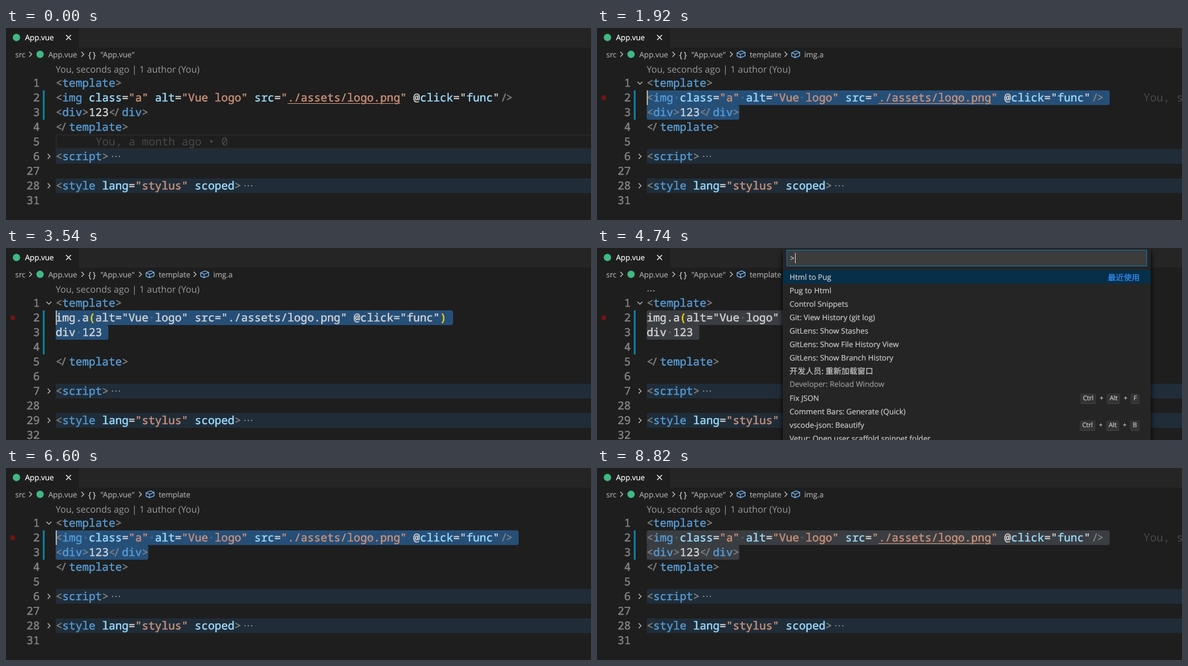
Animation of 954 by 314 pixels, one loop 9 s. Source, as an HTML page:

```html
<!DOCTYPE html>
<html lang="en">
<head>
<meta charset="utf-8">
<title>Html to Pug and back</title>
<style>
html, body { margin: 0; width: 100%; height: 100%; overflow: hidden; background: #1e1e1e; }
body { position: relative; text-rendering: geometricPrecision; -webkit-text-stroke: .2px;
  font: 12.35px/22px "Open Sans", "Noto Sans", "Noto Sans CJK SC", sans-serif; color: #ccc; }
div, pre, svg { position: absolute; margin: 0; white-space: pre; }
pre { left: 81px; top: 102px; color: #d4d4d4; -webkit-text-stroke: .45px;
  font: 500 18px/24px "Noto Sans Mono", "DejaVu Sans Mono", monospace; }

/* syntax colours */
.p { color: #808080; }
.t { color: #569cd6; }
.a { color: #9cdcfe; }
.s { color: #ce9178; }
.g { color: #ffd700; }
.open, .shut { color: #808080; position: relative; left: -3px; }
.shut { left: 2px; }
.dots { color: rgba(227, 228, 226, .2); }
.blame { color: #494949; -webkit-text-stroke: 0; }

/* editor chrome */
.tabs { left: 119px; top: 0; right: 0; height: 32px; background: #252526; }
.name { left: 31px; top: 5px; color: #fff; }
.crumbs { left: 0; top: 33px; color: #a9a9a9; }
.crumbs span { position: absolute; top: 0; }
.crumbs .brace { font-size: 13.5px; letter-spacing: 2.5px; color: #ccc; }
.lens { left: 81px; top: 56px; font-size: 15px; line-height: 24px; color: #999; -webkit-text-stroke: 0; }
.lens.short { top: 53px; font-size: 18px; }
.layer { left: 0; top: 0; width: 954px; height: 314px; }
.nums { left: 0; top: 78px; width: 55px; text-align: right; color: #858585; }
.bar { left: 60px; top: 102px; width: 3px; height: 48px; background: #0c7d9d; }
.current { left: 81px; top: 174px; width: 873px; height: 24px; box-sizing: border-box; border: 2px solid #282828; border-right: 0; }
.tail { left: 0; top: 150px; width: 954px; }
.tail pre { top: 0; }
.fold { left: 81px; right: 0; height: 24px; background: #202d39; }
.more { display: inline-block; width: 16.5px; height: 24px; margin-left: 4px; vertical-align: top;
  background: radial-gradient(circle, #8a8a8a .8px, transparent 1.4px) 0 0 / 5.5px 24px; }
.sel { height: 24px; background: #264f78; border-radius: 3px; }
.one { left: 81px; top: 102px; }
.two { left: 81px; top: 126px; }
.caret { left: 81px; top: 102px; width: 2px; height: 24px; background: #aeafad; }
.icons { left: 0; top: 0; fill: none; stroke: #c5c5c5; stroke-width: 1.2; }

/* command palette */
.palette { left: 303px; top: 0; width: 600px; height: 330px; background: #252526; box-shadow: 0 5px 8px #000; }
.input { left: 6px; top: 3px; width: 581px; height: 25px; padding-left: 5px; line-height: 26px;
  background: #3c3c3c; border: 1px solid #0a78bf; }
.beam { left: 20px; top: 8px; width: 1px; height: 17px; background: #d4d4d4; }
.pick { left: 0; top: 36px; width: 600px; height: 22px; background: #062f4a; }
.list { left: 11px; top: 37px; width: 571px; }
.slider { right: 0; top: 36px; width: 10px; height: 20px; background: rgba(121, 121, 121, .4); }
.zh { font: 13px/22px "Noto Sans CJK SC", "Noto Sans CJK", sans-serif; }
.dim { opacity: .7; line-height: 20px; }
.recent { right: 0; top: 0; color: #3794ff; }
.keys { right: 0; font-size: 10.45px; }
kbd { display: inline-block; font: inherit; line-height: 15px; padding: 0 3.6px; border: 1px solid #333; border-bottom-color: #444;
  border-radius: 3px; background: rgba(128, 128, 128, .17); }
kbd + kbd { margin-left: 17px; position: relative; }
kbd + kbd::before { content: "+"; position: absolute; left: -12.5px; }

/* timeline: one 9 s loop of hard cuts */
.k { animation: 9s step-end infinite; }
.html { animation-name: html; }
.pug { animation-name: pug; }
.tail, .shift { animation-name: shift; }
.bar { animation-name: grow; }
.idle { animation-name: idle; }
.selected { animation-name: selected; }
.sel { animation-name: focus; }
.one.drag { animation-name: drag-one, focus; }
.two.drag { animation-name: drag-two, focus; }
.caret { animation-name: caret, move; }
.lens.full { animation-name: lens; }
.lens.short { animation-name: lens-short; }
.crumb { animation-name: crumb; }
.leaf { animation-name: leaf; }
.link { animation-name: link; text-decoration: underline 1px; text-underline-offset: 3px; }
.chevron { animation-name: chevron; }
.dot { animation-name: dot; }
.blame.first { animation-name: blame; }
.blame.second { animation-name: blame-pug; }
.palette { animation-name: palette; }
.beam { animation-name: beam; }
.pick { animation-name: pick; }
.slider { animation-name: slider; }

@keyframes html { 0%, 73.333% { opacity: 1 } 39.333% { opacity: 0 } }
@keyframes pug { 0%, 73.333% { opacity: 0 } 39.333% { opacity: 1 } }
@keyframes shift { 0%, 73.333% { transform: none } 39.333% { transform: translateY(24px) } }
@keyframes grow { 0%, 73.333% { height: 48px } 39.333% { height: 72px } }
@keyframes idle { 0% { opacity: 1 } 8% { opacity: 0 } }
@keyframes selected { 0% { opacity: 0 } 10% { opacity: 1 } }
@keyframes drag-one { 0% { left: 836px; opacity: 0 } 9.333% { left: 124px; opacity: 1 } 10% { left: 81px; opacity: 1 } }
@keyframes drag-two { 0% { left: 232px; opacity: 0 } 8.666% { left: 189px; opacity: 1 } 9.333% { left: 81px; opacity: 1 } }
@keyframes focus {
  0%, 39.333%, 73.333% { background: #264f78 }
  23.333%, 52.666%, 98% { background: #3a3d41 }
}
@keyframes caret {
  0%, 16%, 23.333%, 44.666%, 52.666%, 78.666%, 89.333%, 98% { opacity: 0 }
  8%, 21.333%, 39.333%, 50%, 73.333%, 84%, 94.666% { opacity: 1 }
}
@keyframes move {
  0% { transform: translate(151px, 24px) }
  8.666% { transform: translate(108px, 24px) }
  9.333% { transform: translate(43px, 0) }
  10% { transform: none }
}
@keyframes lens { 0%, 56.666%, 85.333% { opacity: 1 } 45.333%, 79.333% { opacity: 0 } }
@keyframes lens-short { 0%, 56.666%, 85.333% { opacity: 0 } 45.333%, 79.333% { opacity: 1 } }
@keyframes crumb { 0% { opacity: 0 } 13.333% { opacity: 1 } }
@keyframes leaf { 0%, 46% { opacity: 0 } 13.333%, 79.333% { opacity: 1 } }
@keyframes link { 0%, 86% { text-decoration-color: #ce9178 } 39.333% { text-decoration-color: transparent } }
@keyframes chevron { 0%, 90% { opacity: 0 } 10.666% { opacity: 1 } }
@keyframes dot { 0%, 88.666% { opacity: 0 } 11.333% { opacity: 1 } }
@keyframes blame { 0%, 39.333% { opacity: 0 } 14%, 87.333% { opacity: 1 } }
@keyframes blame-pug { 0%, 73.333% { opacity: 0 } 57.333% { opacity: 1 } }
@keyframes palette { 0%, 39.333%, 73.333% { opacity: 0 } 23.333%, 52.666% { opacity: 1 } }
@keyframes beam { 0%, 34.666%, 64% { opacity: 1 } 28.666%, 58.666%, 70% { opacity: 0 } }
@keyframes pick { 0% { transform: none } 66.666% { transform: translateY(22px) } }
@keyframes slider { 0%, 32%, 62% { opacity: 0 } 24%, 53.333% { opacity: 1 } }
</style>
</head>
<body>
<div class="tabs"></div>
<div class="name">App.vue</div>

<div class="crumbs">
  <span style="left:15px">src</span>
  <span style="left:69px">App.vue</span>
  <span class="brace" style="left:134px">{}</span>
  <span style="left:154px">"App.vue"</span>
  <span class="k crumb" style="left:249px">template</span>
  <span class="k leaf" style="left:338px">img.a</span>
</div>

<div class="lens full k">You, seconds ago | 1 author (You)</div>
<div class="lens short k">…</div>

<div class="layer idle k">
  <div class="current"></div>
  <pre class="blame" style="left:146px;top:174px">You, a month ago • 0</pre>
</div>
<div class="bar k"></div>

<div class="layer html k">
  <div class="sel one drag k" style="right:118px"></div>
  <div class="sel two drag k" style="right:722px"></div>
  <pre class="dots selected k">    ·         ·        ·                       ·</pre>
  <pre><span class="p">&lt;</span><span class="t">img</span> <span class="a">class</span>=<span class="s">"a"</span> <span class="a">alt</span>=<span class="s">"Vue logo"</span> <span class="a">src</span>=<span class="s">"<span class="link k">./assets/logo.png</span>"</span> @<span class="a">click</span>="<span class="a">func</span>"<span class="shut">/</span><span class="p">&gt;</span>
<span class="p">&lt;</span><span class="t">div</span><span class="p">&gt;</span>123<span class="p">&lt;</span><span class="open">/</span><span class="t">div</span><span class="p">&gt;</span></pre>
  <pre class="blame first k" style="left:891px">You, seconds ago</pre>
  <pre class="nums">1
2
3
4
5
6
27
28
31</pre>
</div>

<div class="layer pug k">
  <div class="sel one k" style="width:648px"></div>
  <div class="sel two k" style="width:86.4px"></div>
  <pre class="dots">              ·                       ·
   ·</pre>
  <pre>img.a<span class="g">(</span>alt="Vue logo" src="./assets/logo.png" @click="func"<span class="g">)</span>
div 123</pre>
  <pre class="blame second k" style="left:783px">You, seconds ago</pre>
  <pre class="nums">1
2
3
4
5
6
7
28
29
32</pre>
</div>

<pre style="top:78px"><span class="p">&lt;</span><span class="t">template</span><span class="p">&gt;</span></pre>
<div class="tail k">
  <div class="fold" style="top:48px"></div>
  <div class="fold" style="top:96px"></div>
  <pre><span class="p">&lt;</span><span class="open">/</span><span class="t">template</span><span class="p">&gt;</span>

<span class="p">&lt;</span><span class="t">script</span><span class="p">&gt;</span><span class="more"></span>

<span class="p">&lt;</span><span class="t">style</span> <span class="a">lang</span>=<span class="s">"stylus"</span> <span class="a">scoped</span><span class="p">&gt;</span><span class="more"></span></pre>
</div>
<div class="caret k"></div>

<svg class="icons" width="954" height="314">
  <defs>
    <path id="chev" d="M-2-4 2 0-2 4"/>
    <path id="cube" stroke="#75beff" d="M-6.5-2.5 1-5.5 6.5-3V2.5L-1 5.5-6.5 3ZM-6.5-2.5-1 0 6.5-3M-1 0V5.5"/>
  </defs>
  <g fill="#41b883" stroke="none"><circle cx="17" cy="15.5" r="6"/><circle cx="55.5" cy="43" r="6"/></g>
  <path stroke="#fff" d="m98 11.5 8 8m0-8-8 8"/>
  <use href="#chev" x="40" y="43"/>
  <use href="#chev" x="125" y="43"/>
  <g class="crumb k"><use href="#chev" x="219" y="43"/><use href="#cube" x="235" y="43"/></g>
  <g class="leaf k"><use href="#chev" x="308" y="43"/><use href="#cube" x="324" y="43"/></g>
  <path class="chevron k" d="m66 88 4 4 4-4"/>
  <circle class="dot k" cx="11" cy="114" r="4" fill="#6e1613" stroke="none"/>
  <g class="shift k"><use href="#chev" x="70" y="210"/><use href="#chev" x="70" y="258"/></g>
</svg>

<div class="palette k">
  <div class="input">&gt;</div>
  <div class="beam k"></div>
  <div class="pick k"></div>
  <div class="list">Html to Pug
Pug to Html
Control Snippets
Git: View History (git log)
GitLens: Show Stashes
GitLens: Show File History View
GitLens: Show Branch History
<div class="zh" lang="zh" style="top:153px">开发人员: 重新加载窗口</div><div class="dim" style="top:176px">Developer: Reload Window</div><div class="recent zh" lang="zh">最近使用</div><div style="top:198px">Fix JSON
Comment Bars: Generate (Quick)
vscode-json: Beautify
Vetur: Open user scaffold snippet folder</div><div class="keys" style="top:198px"><kbd>Ctrl</kbd><kbd>Alt</kbd><kbd>F</kbd></div><div class="keys" style="top:242px"><kbd>Ctrl</kbd><kbd>Alt</kbd><kbd>B</kbd></div></div>
  <div class="slider k"></div>
</div>
</body>
</html>
```
